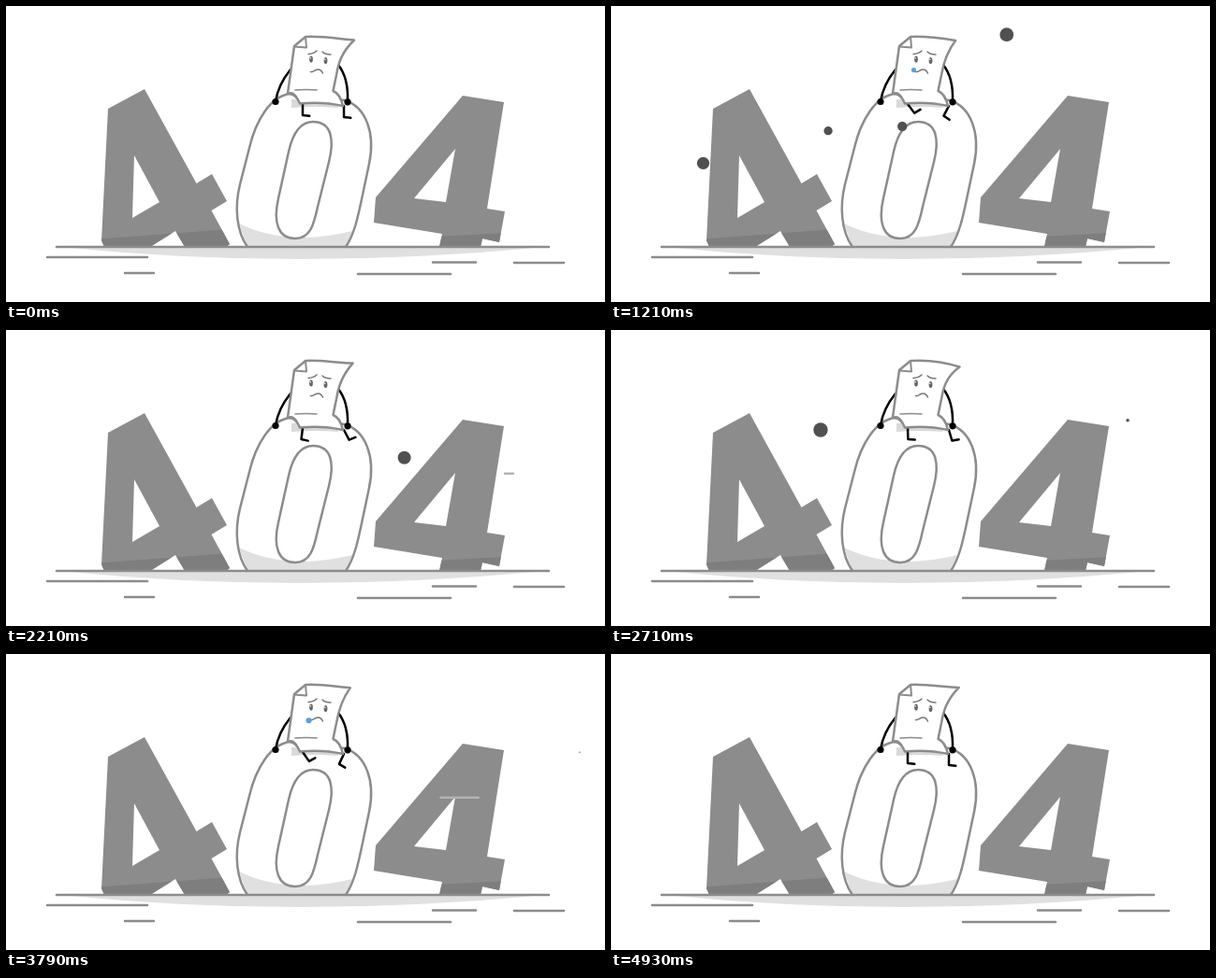
Recreate the animation shown at these times as an HTML page with a canvas. Size 640 by 317 pixels, loop 5000 ms.

```html
<!DOCTYPE html>
<html lang="en">
<head>
<meta charset="utf-8">
<title>404</title>
<style>
  html, body { margin: 0; width: 100%; height: 100%; overflow: hidden; background: #fff; }
  canvas { display: block; }
</style>
</head>
<body>
<canvas id="stage" width="640" height="317"></canvas>
<script>
const ctx = document.getElementById('stage').getContext('2d');
const LOOP = 5000, SWAY = LOOP / 2;
const GRAY = '#8c8c8c', DARK = '#7e7e7e', PALE = '#e0e0e0', DOT = '#505050', TEAR = '#5b9fdc';

const lerp = (a, b, p) => a + (b - a) * p;
const clamp = p => Math.max(0, Math.min(1, p));
// Cosine wave of the body sway; shift is a share of its period.
const wave = (t, shift) => Math.cos(2 * Math.PI * (t / SWAY - shift));

function fill(d, color, rule = 'nonzero') {
  ctx.fillStyle = color;
  ctx.fill(new Path2D(d), rule);
}
function stroke(d, color = GRAY, width = 2.5) {
  ctx.strokeStyle = color;
  ctx.lineWidth = width;
  ctx.stroke(new Path2D(d));
}
function disc(x, y, r, color, ry = r) {
  ctx.fillStyle = color;
  ctx.beginPath();
  ctx.ellipse(x, y, r, ry, 0, 0, Math.PI * 2);
  ctx.fill();
}

function four(outline, hole, shadow) {
  const shape = `${outline} ${hole}`;
  fill(shape, GRAY, 'evenodd');
  ctx.save();
  ctx.clip(new Path2D(shape), 'evenodd');
  fill(shadow, DARK);
  ctx.restore();
}

function scenery() {
  fill('M58 258Q310 284 576 258Z', PALE);
  four('M109 110 148 89 203.5 190 220 180 236 209 219.5 219 239 255 235 258H191L181 241 154 258H105L102 251Z',
    'M137 160 164 210 135 227Z', 'M100 249.5 240 239V260H100Z');
  four('M488 96 532 103 514 217 533 220 527 253 509 249 507 258H463L466 244 393 232 395 205Z',
    'M480 153 470 210 436 206Z', 'M460 247 535 243V260H460Z');

  const zero = 'M258 258C246 241 244 215 250 191L260 152C267 122 283 96 304 94L362 101' +
    'C384 108 395 135 388 169L380 207C376 226 372 245 363 258';
  const hole = 'M328 124C314 124 306 138 302 156L291 206C285 232 291 249 309 249' +
    'C325 249 329 234 333 215L345 167C351 143 348 124 328 124Z';
  fill(zero, '#fff');
  fill('M249 233Q300 258 370 241L363 258H258Z', PALE);
  fill(hole, '#fff');
  stroke(zero);
  stroke(hole);
  stroke('M54 258H580M44 269H151M127 286H158M376 287H475M456 274.5H502M543 275H596');
}

function leg(x, y, angle) {
  ctx.save();
  ctx.translate(x, y);
  ctx.rotate(angle * Math.PI / 180);
  stroke('M0 0V12L7.3 12.8', '#000');
  ctx.restore();
}

function character(t) {
  const rest = clamp(Math.min(t, LOOP - 70 - t) / 300);
  const swing = wave(t, 0.93);
  const x = 370 + 2.5 * wave(t, 0.1);
  const y = 38.5 + 4 * wave(t, 0.25) - 2 * wave(2 * t, 0);

  fill('M305 100H352L355 109Q330 107 305 109Z', '#d9d9d9');
  leg(317, 105, (23 * swing - 15) * rest);
  leg(361, 107, -29 * swing * rest);
  stroke('M304 68Q291 84 288 102M355 63Q366 77 365 102', '#000');
  disc(288, 102.5, 3.6, '#000');
  disc(365, 102.8, 3.6, '#000');

  const page = `M308 43L320 33C335 32 355 ${34 - (y - 39) * 0.4} ${x} ${y}` +
    'C358 50 355 62 353 74L349.5 91Q357 94 360 107Q338 102 314 104.5Q310 94 301 93.5Z';
  fill(page, '#fff');
  stroke(page);
  stroke('M308 43.5 321 44.5 320 33', GRAY, 2);
  stroke('M301 93.5Q307 91 311 98M309 90Q321 89 332 90', GRAY, 1.6);

  stroke('M323 51.5Q329 51 332 48M338 49Q341 52 347 52M325.5 70.5Q328 71 330 69Q336 66 338.5 72', '#777', 1.5);
  for (const [ex, ey] of [[326, 57], [341.5, 58.5]]) {
    disc(ex, ey, 1.9, '#666', 3.5);
    disc(ex - 0.7, ey - 1.2, 0.8, '#fff');
  }
}

// Each dot drifts in a straight line while it grows and shrinks again.
function dot(age, [x0, y0], [x1, y1], color = DOT) {
  const p = age / 850;
  if (p > 0 && p < 1) disc(lerp(x0, x1, p), lerp(y0, y1, p), 8 * Math.sin(Math.PI * p), color);
}

function dots(t) {
  dot(t - 642, [299, 183], [275, 183], '#fff');
  dot(t - 1410, [346, 138], [455, 98], '#fff');
  dot(t - 625, [144, 147], [78, 178]);
  dot(t - 894, [337, 40], [567, 15]);
  dot(t - 1022, [335, 120], [228, 160]);
  dot(t - 1043, [270, 140], [78, 108]);
  dot(t - 1920, [352, 160], [567, 92]);
  dot(t - 2360, [290, 140], [130, 60]);
  dot(t - 2965, [335, 41], [621, 107]);
  dot(t - 4000, [370, 150], [550, 205]);
}

// A tear swells below the eye, then falls freely.
function tear(age) {
  if (age < 0 || age > 1050) return;
  const fall = Math.max(0, age - 640);
  const y = 63 + Math.min(age, 640) * 0.014 + fall * fall * 0.00095;
  disc(lerp(325, 323.5, clamp(age / 400)), y, 1.5 + age * 0.0026, TEAR);
}

function streak(age) {
  if (age < 0 || age > 725) return;
  const head = lerp(79, 542, clamp(age / 610));
  const tail = lerp(79, 542, 1 - Math.pow(1 - clamp((age - 185) / 540), 1.5));
  stroke(`M${tail} 153.8H${head}`, '#b3b3b3');
}

function draw(t) {
  ctx.fillStyle = '#fff';
  ctx.fillRect(0, 0, 640, 317);
  ctx.lineCap = ctx.lineJoin = 'round';
  scenery();
  character(t);
  dots(t);
  for (const start of [1525, 3230]) streak(t - start);
  for (const start of [810, 3200]) tear(t - start);
}

const origin = performance.now();
function tick() {
  draw(Math.max(0, performance.now() - origin) % LOOP);
  requestAnimationFrame(tick);
}
tick();
</script>
</body>
</html>
```
